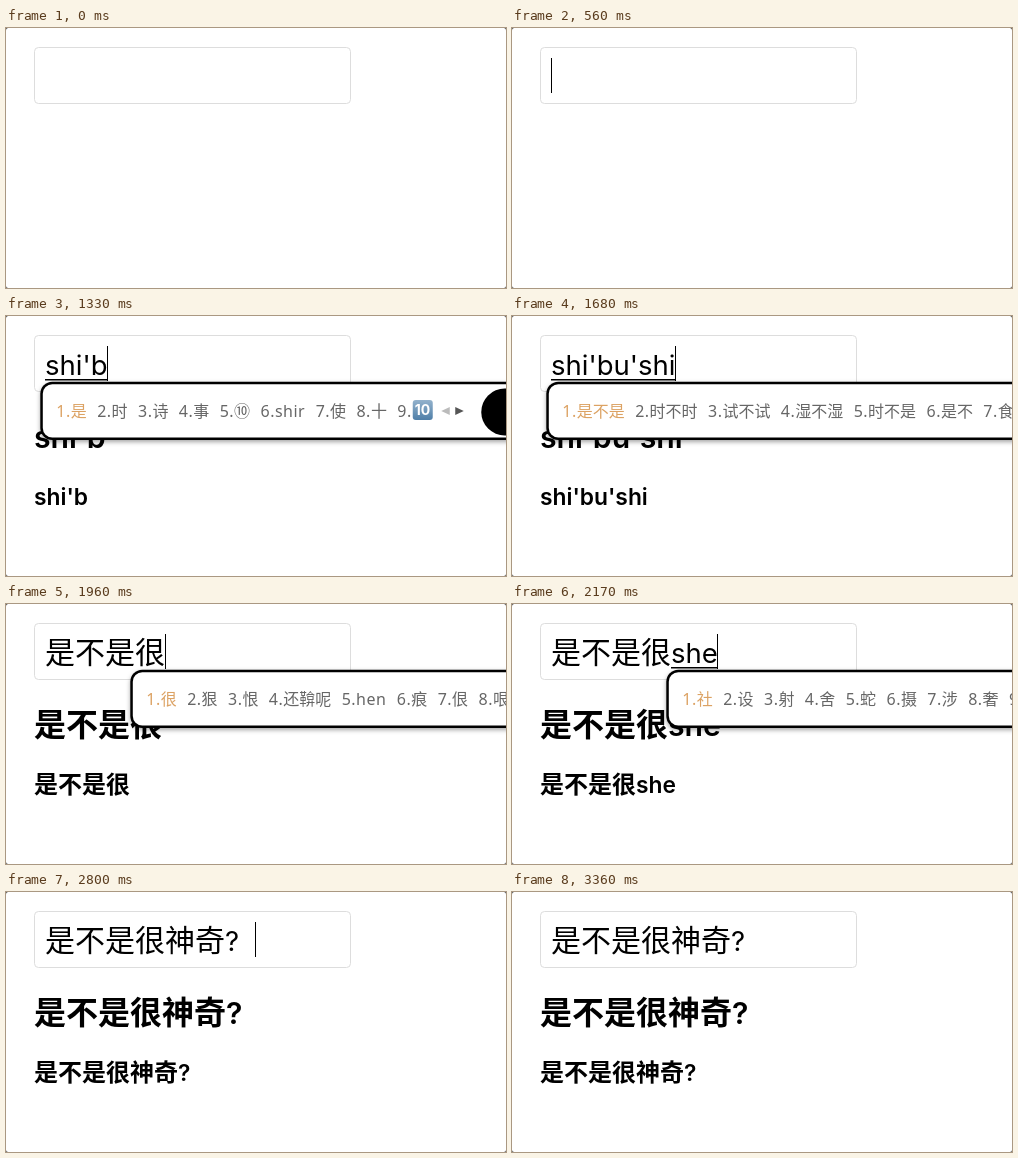
These frames come from a looping animation (500x260 px, 3.5 s). An HTML page with a canvas:

```html
<!DOCTYPE html>
<html lang="zh-CN">
<head>
<meta charset="utf-8">
<style>
html, body { margin: 0; width: 100%; height: 100%; overflow: hidden; background: #fff; }
canvas { display: block; }
</style>
</head>
<body>
<canvas id="stage" width="500" height="260"></canvas>
<script>
const ctx = document.getElementById('stage').getContext('2d');
const LOOP = 3500, TICK = 70;
const CJK = '"Noto Sans CJK SC", "Noto Sans CJK", sans-serif';

const STYLES = {
  input: { size: 30, weight: 400, latin: 27.5 },
  h1: { size: 32, weight: 600, latin: 30.2 },
  h2: { size: 24, weight: 600, latin: 22.8 }
};

// Candidate lists; E = arrow emoji, K = keycap emoji, U = up arrow
const WORDS = {
  s: '是 说 上 E 啥 U 时 诗 睡',
  sh: '是 说 上 时 啥 事 使 诗 睡',
  shi: '是 时 诗 事 ⑩ shir 使 十 K',
  shib: '是不 时报 失败 士兵 世博 十八 识别',
  shibu: '是不 师部 使不 时不 事不 拾步 十步',
  shibus: '是不是 是不 时不时 试不试 师部 使不',
  shibushi: '是不是 时不时 试不试 湿不湿 时不是 是不 食不',
  h: '和 很 好 会 还 后 或 话 回',
  hen: '很 狠 恨 还鞥呢 hen 痕 佷 哏 詪',
  she: '社 设 射 舍 蛇 摄 涉 奢 赦',
  shen: '身 神 深 什 伸 审 沈 甚 肾',
  shenqi: '神奇 神器 神气 肾气 神起 神泣 神祇'
};

// [text, length already committed, list shown], one per tick from 1050 ms
const TYPING = [
  ['s', 0, 's'], ['sh', 0, 's'], ['sh', 0, 'sh'], ['shi', 0, 'shi'],
  ["shi'b", 0, 'shi'], ["shi'bu", 0, 'shib'], ["shi'bu's", 0, 'shibu'],
  ["shi'bu'sh", 0, 'shibus'], ["shi'bu'shi", 0, 'shibus'],
  ["shi'bu'shi", 0, 'shibushi'], ['是不是', 0, 'shibushi'],
  ['是不是h', 3, 'h'], ['是不是hen', 3, 'hen'], ['是不是很', 3, 'hen'],
  ['是不是很s', 4, 's'], ['是不是很sh', 4, 'sh'], ['是不是很she', 4, 'she'],
  ['是不是很shen', 4, 'shen'], ["是不是很shen'q", 4, 'shen'],
  ["是不是很shen'qi", 4, 'shenqi'], ['是不是很神奇', 4, 'shenqi']
];

function stateAt(t) {
  if (t < 1050) return ['', 0, null];
  if (t >= 2800) return ['是不是很神奇?', 7, null];
  return TYPING[Math.floor((t - 1050) / TICK)] || ['是不是很神奇', 6, null];
}

// Draws mixed text and returns its right end
function drawText(text, x, y, style) {
  ctx.fillStyle = '#000';
  for (const run of text.match(/[ -~]+|[^ -~]+/g) || []) {
    const latin = run.charCodeAt(0) < 128;
    ctx.font = latin
      ? `${style.weight} ${style.latin}px Inter, sans-serif`
      : `${style.weight} ${style.size}px ${CJK}`;
    ctx.fillText(run, x, y);
    x += run === '?' ? style.size : ctx.measureText(run).width;
  }
  return x;
}

function box(x, y, w, h, r, fill) {
  ctx.beginPath();
  ctx.roundRect(x, y, w, h, r);
  if (fill) {
    ctx.fillStyle = fill;
    ctx.fill();
  }
}

function line(color, width, ...pts) {
  ctx.strokeStyle = color;
  ctx.lineWidth = width;
  ctx.beginPath();
  pts.forEach(([x, y]) => ctx.lineTo(x, y));
  ctx.stroke();
}

function triangle(x, dir, color) {
  ctx.fillStyle = color;
  ctx.beginPath();
  ctx.moveTo(x + 4.5 * dir, 95);
  ctx.lineTo(x - 4 * dir, 91);
  ctx.lineTo(x - 4 * dir, 99);
  ctx.fill();
}

function tile(x) {
  const g = ctx.createLinearGradient(0, 84, 0, 104);
  g.addColorStop(0, '#93b2cc');
  g.addColorStop(1, '#4f7fa8');
  box(x, 84, 20, 20, 3, g);
}

// Each returns the advance width
const GLYPHS = {
  E(x) {
    tile(x + 1);
    line('#fff', 2.6, [x + 5, 99], [x + 9, 99], [x + 12.5, 96], [x + 12.5, 90]);
    line('#fff', 2.6, [x + 8, 92.5], [x + 12.5, 88], [x + 17, 92.5]);
    box(x + 24.5, 87.5, 8, 7, 2);
    ctx.strokeStyle = '#555';
    ctx.lineWidth = 1;
    ctx.stroke();
    line('#555', 1, [x + 26.5, 91], [x + 30.5, 91]);
    return 32;
  },
  K(x) {
    tile(x + 1);
    ctx.fillStyle = '#fff';
    ctx.font = '700 14px Inter, sans-serif';
    ctx.fillText('10', x + 3, 99);
    return 22;
  },
  U(x) {
    line('#666', 1.3, [x + 6, 101], [x + 6, 89]);
    line('#666', 1.3, [x + 3, 92.5], [x + 6, 89], [x + 9, 92.5]);
    return 12;
  }
};

// Draws one piece of a candidate and returns its right end
function drawItem(text, x) {
  if (GLYPHS[text]) return x + GLYPHS[text](x);
  ctx.font = `400 16px "Noto Sans", ${CJK}`;
  ctx.letterSpacing = /^[ -~]/.test(text) ? '0.5px' : '0px';
  ctx.fillText(text, x, 101);
  const end = x + ctx.measureText(text).width;
  ctx.letterSpacing = '0px';
  return end;
}

function drawPanel(left, list) {
  ctx.save();
  ctx.shadowColor = 'rgba(0,0,0,.35)';
  ctx.shadowBlur = 4;
  ctx.shadowOffsetY = 2;
  box(left - 4, 65.7, 520, 58.3, 12, '#000');
  ctx.restore();
  box(left - 1.5, 68.2, 515, 53.3, 9.5, '#fff');

  const gap = 10.4;
  let x = left + 12;
  list.split(' ').forEach((word, i) => {
    ctx.fillStyle = i ? '#666' : '#dca263';
    x = drawItem(word, drawItem(i + 1 + '.', x)) + gap;
  });

  const end = x - gap;
  triangle(end + 12, -1, '#bbb');
  triangle(end + 25.5, 1, '#555');
  ctx.fillStyle = '#000';
  ctx.beginPath();
  ctx.arc(end + 71, 96, 23.5, 0, 7);
  ctx.fill();
}

function draw(t) {
  ctx.fillStyle = '#555';
  ctx.fillRect(0, 0, 500, 260);
  box(0, 0, 500, 260, 2.5, '#fff');

  box(28.5, 19.5, 316, 56, 4);
  ctx.strokeStyle = '#ddd';
  ctx.lineWidth = 1;
  ctx.stroke();

  const [text, done, list] = stateAt(t);
  const start = 39 + done * STYLES.input.size;
  const end = drawText(text, 39, 59, STYLES.input);
  drawText(text, 28, 132, STYLES.h1);
  drawText(text, 28, 189, STYLES.h2);

  ctx.fillStyle = '#000';
  if (/[a-z]/.test(text)) ctx.fillRect(start, 63, end - start, 1.5);
  if (t >= 560 && t < 3360) ctx.fillRect(Math.floor(end + 0.01), 30, 1, 35);
  if (list) drawPanel(start - 0.7, WORDS[list]);
}

function tick() {
  draw(performance.now() % LOOP);
  requestAnimationFrame(tick);
}
tick();
</script>
</body>
</html>
```
